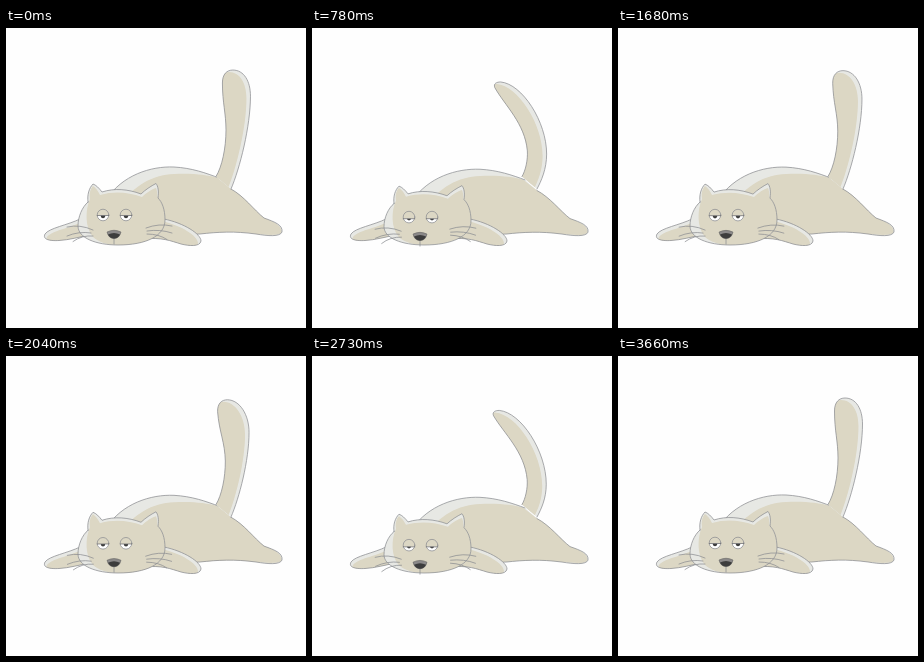
An HTML page that plays this animation: 300x300 px, repeating every 3.69 s.

```html
<!DOCTYPE html>
<html>
<head>
<meta charset="utf-8">
<title>Lazy cat</title>
<style>
html, body { margin: 0; width: 100%; height: 100%; overflow: hidden; background: #fefefe; }
svg { display: block; width: 100vw; height: 100vh; }
.light { fill: #e7e8e4; }
.fur { fill: #dcd7c4; }
.line { fill: none; stroke: #8c8e92; stroke-width: .75; stroke-linejoin: round; stroke-linecap: round; }
</style>
</head>
<body>
<svg viewBox="0 0 300 300">
  <defs>
    <path id="tail"/>
    <path id="body" d="M225 161C238 168 248 182 258 190C269 194 277 197 276 204C274 209 262 208 250 206C228 203 212 204 194 206L130 208L100 172C116 147 145 138 168 139C186 140 200 145 213 150"/>
    <path id="pawL" d="M74 191C62 197 43 200 39 206C36 212 45 213 53 212.500C63 212 73 209 84 207Z"/>
    <path id="pawR" d="M158 191C178 195 195 206 195 213C194 219 183 218 175 216C165 213 156 209 138 211"/>
    <path id="head" d="M82 174C76 179 72 189 72 198C72 210 90 217 112 217C140 217 159 208 159 192C159 181 156 174 152 170C153 163 152 158 150 155.500C145 158 139 162 135 166C122 161 108 160 96 164C93 160 90 157 87 156C83 160 81 167 82 174Z"/>
    <clipPath id="tailClip"><use href="#tail"/></clipPath>
    <clipPath id="pawLClip"><use href="#pawL"/></clipPath>
    <clipPath id="pawRClip"><use href="#pawR"/></clipPath>
    <clipPath id="eyeOpen"><rect id="opening" x="-8" width="16" height="12"/></clipPath>
    <g id="eye">
      <circle r="5.800" class="fur"/>
      <g clip-path="url(#eyeOpen)">
        <circle r="5.800" fill="#fff"/>
        <circle cy="1.200" r="2.100" fill="#3d3d3d"/>
      </g>
      <circle r="5.800" class="line"/>
      <path id="lid" d="M-5.800 0H5.800" class="line" style="stroke:#6c6d70"/>
    </g>
  </defs>

  <g id="torso">
    <use href="#body" class="light"/>
    <path class="fur" d="M112 180C128 157 146 147 168 146C188 145 200 147 211 149.500L225 161C238 168 248 182 258 190C269 194 276 198 275.500 204C274 208 262 207 250 206C228 203 212 204 194 206L130 208Z"/>
    <use href="#body" class="line"/>
  </g>

  <use href="#tail" class="light"/>
  <g clip-path="url(#tailClip)"><use href="#tail" class="fur" x="-4" y="2"/></g>
  <use href="#tail" class="line"/>

  <use href="#pawL" class="light"/>
  <g clip-path="url(#pawLClip)"><use href="#pawL" class="fur" x="2" y="3"/></g>
  <use href="#pawL" class="line"/>
  <use href="#pawR" class="light"/>
  <g clip-path="url(#pawRClip)"><use href="#pawR" class="fur" x="-3" y="2"/></g>
  <use href="#pawR" class="line"/>

  <g id="skull">
    <use href="#head" class="light"/>
    <path class="fur" d="M84 171C83 164 85 160 87 158C90 160 92 163 94 167C108 163 122 164 136 169C140 165 146 161 150 160C152 165 151 169 152 170C156 174 159 181 159 192C159 208 140 217 112 217C102 217 92 214 87 209C79 200 79 182 84 171Z"/>
    <use href="#head" class="line"/>
  </g>

  <g id="face">
    <use href="#eye" x="97" y="187"/>
    <use href="#eye" x="120" y="187"/>
    <path class="line" d="M108 209V216"/>
    <path fill="#8b8989" stroke="#555" stroke-width=".5" d="M101 204Q108 200.500 115 204Q113.500 210.500 108 210.500Q102.500 210.500 101 204Z"/>
    <path fill="#3d3d3d" d="M102 206.500Q108 203.500 114 206.500Q112 210.500 108 210.500Q104 210.500 102 206.500Z"/>
  </g>
  <path id="whiskersL" class="line" d="M87 202Q74 196 61 199M85 205Q73 203 61 208M87 208Q76 207 67 213.500"/>
  <path id="whiskersR" class="line" d="M140 200Q153 195 166 198M141 203Q154 201 166 205M141 206Q153 206 161 211.500"/>
</svg>
<script>
const LOOP = 3690, STEP = 30, SWAYS = 2;
const $ = id => document.getElementById(id);

// Tail outlines: base, left edge, tip, right edge, base
const upright = [210,148.5, 216,139, 220,120, 220,102, 220,85, 216.5,75, 216.5,55, 216.5,46, 221,42, 227,42, 238,42, 244.5,53, 244.5,68, 244.5,98, 234,140, 225,161];
const leaning = [210,148.5, 214,142, 216.5,130, 216,120, 214,94, 196,77, 187.5,59, 186,54, 190,52.3, 194,52.3, 214,54, 236,88, 236,118, 236,135, 230,151, 225,161];

const squash = (k, base) => `translate(0 ${base * (1 - k)}) scale(1 ${k})`;

function draw(time) {
  const t = Math.floor(time % LOOP / STEP) * STEP;
  const phase = t / LOOP * SWAYS - .4835;
  const sway = (1 + Math.cos(2 * Math.PI * phase)) / 2;
  const lean = sway / .83;

  const p = upright.map((v, i) => (v + (leaning[i] - v) * lean).toFixed(2));
  $('tail').setAttribute('d', `M${p.slice(0, 2)}C${p.slice(2)}`);

  $('torso').setAttribute('transform', squash(1 - .028 * lean, 208));
  $('skull').setAttribute('transform', squash(1 - .03 * lean, 217));
  $('face').setAttribute('transform', `translate(0 ${1.8 * lean})`);
  const lidY = .5 + lean;
  $('opening').setAttribute('y', lidY);
  $('lid').setAttribute('transform', `translate(0 ${lidY})`);
  $('whiskersL').setAttribute('transform', `translate(${2 * lean} ${lean}) rotate(${-2 * lean} 87 205)`);
  $('whiskersR').setAttribute('transform', `translate(${-2 * lean} ${lean}) rotate(${2 * lean} 141 203)`);
}

function tick() {
  draw(performance.now());
  requestAnimationFrame(tick);
}
tick();
</script>
</body>
</html>
```
